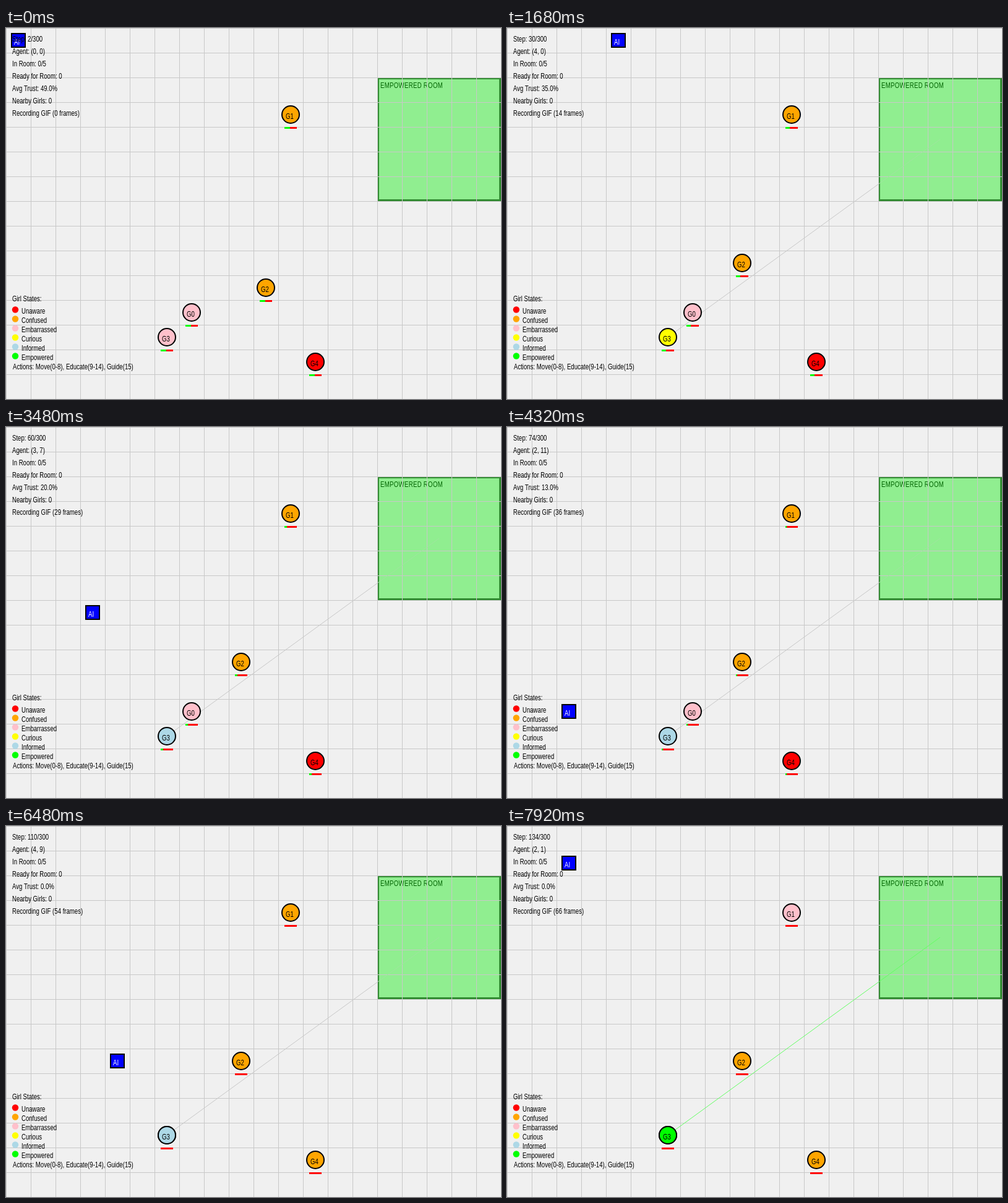
These frames come from a looping animation (800x600 px, 8000 ms). An HTML page with a canvas:

```html
<!DOCTYPE html>
<html lang="en">
<head>
<meta charset="utf-8">
<title>Grid agent</title>
<style>
  html, body { margin: 0; width: 100%; height: 100%; overflow: hidden; background: #f0f0f0; }
  canvas { display: block; }
</style>
</head>
<body>
<canvas id="stage" width="800" height="600"></canvas>
<script>
const ctx = document.getElementById('stage').getContext('2d');
const LOOP = 8000, TICK = 120, CELL = 40, NARROW = 0.8;

const COLORS = {
  Unaware: '#ff0000', Confused: '#ffa500', Embarrassed: '#ffc0cb',
  Curious: '#ffff00', Informed: '#add8e6', Empowered: '#00ff00'
};

// Agent waypoints: [tick, column, row]
const ROUTE = [
  [0, 0, 0], [8, 5, 3], [11, 4, 0], [20, 3, 1], [24, 3, 0], [29, 3, 7],
  [40, 2, 14], [44, 1, 14], [47, 0, 13], [54, 4, 9], [66, 2, 1]
];

// Each entry: [from tick, column, row, state]
const GIRLS = [
  [[0, 7, 11, 'Embarrassed'], [49, 6, 12, 'Embarrassed']],
  [[0, 11, 3, 'Confused'], [60, 11, 3, 'Embarrassed']],
  [[0, 10, 10, 'Confused'], [14, 9, 9, 'Confused']],
  [[0, 6, 12, 'Embarrassed'], [11, 6, 12, 'Curious'], [25, 6, 12, 'Informed'], [65, 6, 12, 'Empowered']],
  [[0, 12, 13, 'Unaware'], [33, 11, 13, 'Unaware'], [52, 12, 13, 'Confused']]
];

const center = cell => cell * CELL + CELL / 2;

function rect(x, y, w, h, color) {
  ctx.fillStyle = color;
  ctx.fillRect(x, y, w, h);
}

function text(str, x, y, color = '#000', spacing = 0) {
  ctx.save();
  ctx.translate(x, y);
  ctx.scale(NARROW, 1);
  ctx.font = '12px "Liberation Sans", Arial, sans-serif';
  ctx.letterSpacing = spacing + 'px';
  ctx.fillStyle = color;
  ctx.fillText(str, 0, 0);
  ctx.restore();
}

function disc(x, y, r, color) {
  ctx.beginPath();
  ctx.arc(x, y, r, 0, Math.PI * 2);
  ctx.fillStyle = color;
  ctx.fill();
}

function segment(x1, y1, x2, y2, color) {
  ctx.beginPath();
  ctx.moveTo(x1, y1);
  ctx.lineTo(x2, y2);
  ctx.strokeStyle = color;
  ctx.lineWidth = 1;
  ctx.stroke();
}

function agentAt(tick) {
  const i = Math.max(1, ROUTE.findIndex(p => p[0] >= tick));
  const [t0, x0, y0] = ROUTE[i - 1], [t1, x1, y1] = ROUTE[i];
  const k = (tick - t0) / (t1 - t0);
  return [Math.round(x0 + (x1 - x0) * k), Math.round(y0 + (y1 - y0) * k)];
}

function drawBoard() {
  rect(0, 0, 800, 600, '#f0f0f0');
  rect(600, 80, 200, 200, '#328c32');
  rect(603, 83, 194, 194, '#90ee90');
  text('EMPOWERED ROOM', 605, 97, '#006400', 0.4);
  for (let x = 0; x < 800; x += CELL) rect(x, 0, 1, 600, '#c8c8c8');
  for (let y = 0; y < 600; y += CELL) rect(0, y, 800, 1, '#c8c8c8');
}

function drawGuide(x, y, state) {
  const endX = 700, endY = 180, wallX = 602;
  const wallY = y + (endY - y) * (wallX - x) / (endX - x);
  const ready = state === 'Empowered';
  segment(x, y, wallX, wallY, ready ? '#64ff64' : '#c8c8c8');
  segment(wallX, wallY, endX, endY, ready ? '#64ff64' : '#9fe59f');
}

function drawGirl(id, x, y, state, trust) {
  disc(x, y, 15, '#000');
  disc(x, y, 13, COLORS[state]);
  text('G' + id, x - 8, y + 7);
  rect(x - 10, y + 20, 20, 3, '#ff0000');
  rect(x - 10, y + 20, Math.floor(trust / 5), 3, '#00ff00');
}

function drawAgent(col, row) {
  const x = center(col), y = center(row);
  rect(x - 12, y - 12, 24, 24, '#000');
  rect(x - 10, y - 10, 20, 20, '#0000ff');
  text('AI', x - 7, y + 7, '#fff');
}

function drawPanel(tick, col, row, trust) {
  [
    `Step: ${2 + tick * 2}/300`,
    `Agent: (${col}, ${row})`,
    'In Room: 0/5',
    'Ready for Room: 0',
    `Avg Trust: ${trust.toFixed(1)}%`,
    'Nearby Girls: 0',
    `Recording GIF (${tick} frames)`
  ].forEach((line, i) => text(line, 10, 22 + i * 20));

  text('Girl States:', 10, 442);
  Object.entries(COLORS).forEach(([name, color], i) => {
    disc(15, 455.5 + i * 15, 5.2, color);
    text(name, 25, 462 + i * 15);
  });
  text('Actions: Move(0-8), Educate(9-14), Guide(15)', 11, 552);
}

function draw(tick) {
  const trust = Math.max(0, 49 - tick);
  const [col, row] = agentAt(tick);
  const girls = GIRLS.map(steps => {
    const [, c, r, state] = steps.filter(s => s[0] <= tick).pop();
    return { x: center(c), y: center(r), state };
  });

  drawBoard();
  for (const { x, y, state } of girls) {
    if (['Curious', 'Informed', 'Empowered'].includes(state)) drawGuide(x, y, state);
  }
  girls.forEach(({ x, y, state }, id) => drawGirl(id, x, y, state, trust));
  drawAgent(col, row);
  drawPanel(tick, col, row, trust);
}

const start = performance.now();
function loop() {
  draw(Math.floor(((performance.now() - start) % LOOP) / TICK));
  requestAnimationFrame(loop);
}
loop();
</script>
</body>
</html>
```
